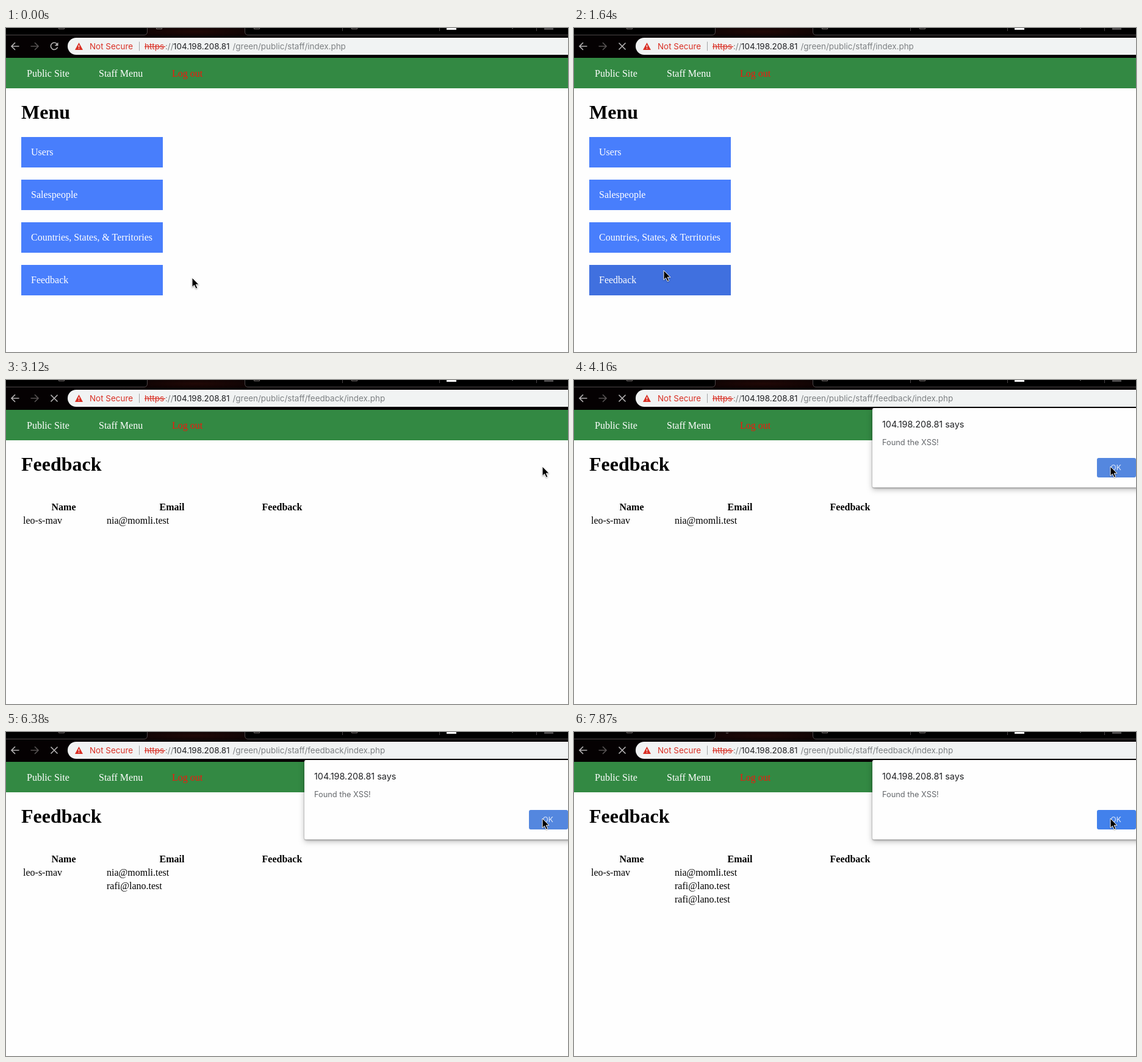
An HTML page that plays this animation: 921x532 px, repeating every 8000 ms.

```html
<!DOCTYPE html>
<html lang="en">
<head>
<meta charset="utf-8">
<title>Staff menu</title>
<style>
html, body { margin: 0; width: 100%; height: 100%; overflow: hidden; background: #fefefe; }
svg { display: block; }
.ui { font: 13.45px Inter, "Open Sans", sans-serif; }
.page { font: 16px "Liberation Serif", serif; }
h1, .h1 { font-size: 32px; font-weight: bold; }
.bold { font-weight: bold; }
.says { font-size: 14.4px; fill: #202124; }
.msg { font-size: 12.8px; fill: #65686c; }
.ok { font-size: 12px; fill: #dfe9fb; }
.line { fill: none; stroke: #4b4648; }
.icon { fill: none; stroke: #b3b0b1; stroke-width: 1.7; }
.box { filter: drop-shadow(0 1px 1px #0006) drop-shadow(0 3px 5px #0004); }

/* every state change is a hard cut */
.anim { animation: 8s step-end infinite; }
#menu { animation-name: menu; }
#busy { animation-name: busy; }
#idle { animation-name: idle; }
#hover { animation-name: hover; }
#loaded { animation-name: loaded; }
#urlA { animation-name: menu; }
#urlB { animation-name: urlB; }
#row2 { animation-name: row2; }
#row3 { animation-name: row3; }
#dialog { animation-name: dialog; }
#msg { animation-name: msg; }
#btn { animation-name: btn; }
#cursor { animation-name: cursor; }
#spin { animation-name: spin; transform-origin: 251px -5px; }

@keyframes menu { 0% { opacity: 1 } 22.35%, 100% { opacity: 0 } }
@keyframes urlB { 0% { opacity: 0 } 22.35%, 100% { opacity: 1 } }
@keyframes idle { 0% { opacity: 1 } 14.85%, 100% { opacity: 0 } }
@keyframes busy { 0% { opacity: 0 } 14.85%, 100% { opacity: 1 } }
@keyframes hover { 0% { opacity: 0 } 11.2%, 100% { opacity: 1 } }
@keyframes loaded { 0% { opacity: 0 } 38.95%, 100% { opacity: 1 } }
@keyframes row2 { 0% { opacity: 0 } 72.3%, 100% { opacity: 1 } }
@keyframes row3 { 0% { opacity: 0 } 96.4%, 100% { opacity: 1 } }
@keyframes dialog {
  0% { opacity: 0 } 24.2% { opacity: 1 }
  37.1% { opacity: 0 } 40.8% { opacity: 1 }
  70.4% { opacity: 0 } 72.3% { opacity: 1 }
  94.6% { opacity: 0 } 96.4%, 100% { opacity: 1 }
}
@keyframes msg {
  0% { opacity: 1 } 35.2% { opacity: 0 } 40.8% { opacity: 1 }
  68.6% { opacity: 0 } 72.3% { opacity: 1 }
  92.8% { opacity: 0 } 96.4%, 100% { opacity: 1 }
}
@keyframes btn {
  0% { fill: #4281ec; filter: none }
  33.3% { fill: #5487df; filter: none }
  35.2% { fill: #4783ea; filter: drop-shadow(0 1px 1px #0005) }
  40.8% { fill: #4281ec; filter: none }
  50.1% { fill: #5487df; filter: none }
  68.6% { fill: #4783ea; filter: drop-shadow(0 1px 1px #0005) }
  72.3% { fill: #4281ec; filter: none }
  76% { fill: #5487df; filter: none }
  92.8% { fill: #4783ea; filter: drop-shadow(0 1px 1px #0005) }
  96.4%, 100% { fill: #4281ec; filter: none }
}
@keyframes cursor {
  0% { transform: translate(305px, 410px) }
  1.85% { transform: translate(238px, 425px) }
  3.7% { transform: translate(186px, 418px) }
  11.2% { transform: translate(166px, 408px) }
  13.1% { transform: translate(147px, 398px) }
  26% { transform: translate(215px, 374px) }
  27.8% { transform: translate(430px, 298px) }
  29.7% { transform: translate(690px, 204px) }
  31.6% { transform: translate(845px, 153px) }
  33.3%, 100% { transform: translate(879px, 142px) }
}
@keyframes spin {
  0% { opacity: 0; transform: rotate(0) }
  14.85% { opacity: 1; transform: rotate(150deg) }
  24.2% { transform: rotate(-40deg); opacity: 1 }
  29.7% { transform: rotate(180deg); opacity: 1 }
  42.7% { transform: rotate(40deg); opacity: 1 }
  50.1% { transform: rotate(180deg); opacity: 1 }
  61.2% { transform: rotate(0); opacity: 1 }
  63% { transform: rotate(180deg); opacity: 1 }
  66.7% { transform: rotate(-45deg); opacity: 1 }
  74.1% { transform: rotate(180deg); opacity: 1 }
  87.2% { transform: rotate(35deg); opacity: 1 }
  91% { transform: rotate(180deg); opacity: 1 }
  98.3%, 100% { transform: rotate(0); opacity: 1 }
}
</style>
</head>
<body>
<svg width="921" height="532" viewBox="0 0 921 532">
  <defs>
    <radialGradient id="glow">
      <stop offset="0" stop-color="#210806"/>
      <stop offset="1" stop-color="#050102"/>
    </radialGradient>
    <path id="doc" class="line" d="M.5 -8V1.5H9.5V-8" style="stroke:#77706f"/>
    <g id="nav">
      <rect y="49" width="921" height="50" fill="#338943"/>
      <g fill="#fff">
        <text x="34" y="80">Public Site</text>
        <text x="152" y="80">Staff Menu</text>
      </g>
      <text x="272" y="80" fill="#f5150c">Log out</text>
    </g>
  </defs>
  <rect width="921" height="532" fill="#fefefe"/>

  <g class="page">
    <g id="menu" class="anim">
      <use href="#nav"/>
      <text class="h1" x="25" y="149">Menu</text>
      <path fill="#487efc" d="M25 179h232v50H25zm0 70h232v50H25zm0 70h232v50H25zm0 70h232v50H25z"/>
      <rect id="hover" class="anim" x="25" y="389" width="232" height="50" fill="#4070df"/>
      <g fill="#fff">
        <text x="41" y="209">Users</text>
        <text x="41" y="279">Salespeople</text>
        <text x="41" y="349">Countries, States, &amp; Territories</text>
        <text x="41" y="419">Feedback</text>
      </g>
    </g>
    <g id="loaded" class="anim">
      <use href="#nav"/>
      <text class="h1" x="25" y="149">Feedback</text>
      <g class="bold">
        <text x="74.5" y="214">Name</text>
        <text x="251.5" y="214">Email</text>
        <text x="419.5" y="214">Feedback</text>
      </g>
      <text x="28" y="236">leo-s-mav</text>
      <text x="165" y="236">nia@momli.test</text>
      <text id="row2" class="anim" x="165" y="258">rafi@lano.test</text>
      <text id="row3" class="anim" x="165" y="280">rafi@lano.test</text>
    </g>
  </g>

  <g class="ui">
    <rect width="921" height="49" fill="#050102"/>
    <ellipse cx="310" cy="6" rx="150" ry="12" fill="url(#glow)"/>
    <path fill="#000" d="M0 0H231V6Q231 11 226 11H0zM392 0H921V11H397Q392 11 392 6z"/>
    <path class="line" d="M0 11.5H226Q231.500 11.500 231.500 6V0M391.500 0V6Q391.500 11.500 397 11.500H921M551.500 0V5M710.500 0V5M869.500 0V5"/>
    <use href="#doc" x="86"/>
    <use id="idle" class="anim" href="#doc" x="246"/>
    <use href="#doc" x="406"/>
    <use href="#doc" x="566"/>
    <path id="spin" class="anim line" d="M249 1.700A7 7 0 0 0 253 1.700" style="stroke:#6a6566"/>
    <rect x="722" width="16" height="3" fill="#f4f4f4"/>
    <rect x="882" width="15" height="3" fill="#4c4a4b"/>
    <rect x="829" width="2" height="1" fill="#666"/>

    <path class="icon" d="M21.500 30H9.500M15 24L9 30l6 6"/>
    <path class="icon" d="M40.500 30H52.500M47 24l6 6-6 6" style="stroke:#565152"/>
    <g class="anim" style="animation-name:idle">
      <path class="icon" d="M83.600 26.200A5.700 5.700 0 1 0 84.500 31.500"/>
      <path fill="#b3b0b1" d="M85.500 23.500V29.300H79.700z"/>
    </g>
    <path id="busy" class="anim icon" d="M73.500 24.500l11 11m0-11l-11 11"/>

    <rect x="101" y="16" width="860" height="28" rx="14" fill="#f1f3f3"/>
    <path fill="#d93025" d="M119.500 24L126 36H113z"/>
    <path stroke="#fff" stroke-width="1.300" d="M119.500 28v3.700m0 1.200v1.300"/>
    <text x="137" y="35" fill="#d93025">Not Secure</text>
    <path stroke="#a2a4a6" d="M218.500 22.500V37.500"/>
    <text x="227" y="35" fill="#d93025">https</text>
    <path stroke="#d93025" stroke-width="1.200" d="M227 30.600H261"/>
    <text x="261" y="35" fill="#7d8083">://</text>
    <text x="274" y="35" fill="#202124">104.198.208.81</text>
    <g fill="#7d8083">
      <text id="urlA" class="anim" x="371.500" y="35">/green/public/staff/index.php</text>
      <text id="urlB" class="anim" x="371.500" y="35">/green/public/staff/feedback/index.php</text>
    </g>

    <g id="dialog" class="anim">
      <rect class="box" x="489" y="46" width="450" height="130.500" rx="2.500" fill="#fefefe"/>
      <text class="says" x="505" y="78">104.198.208.81 says</text>
      <text id="msg" class="anim msg" x="505" y="107">Found the XSS!</text>
      <rect id="btn" class="anim" x="857" y="128" width="64" height="32" rx="3"/>
      <text class="ok" x="879.500" y="148">OK</text>
    </g>
  </g>

  <path id="cursor" class="anim" d="M0 0V15.500L3.500 12.200L6.200 18L8.800 16.800L6.200 11.200H11z"
    fill="#000" stroke="#fff" stroke-width="1" style="filter:drop-shadow(0 1px 1px #0005)"/>
</svg>
</body>
</html>
```
